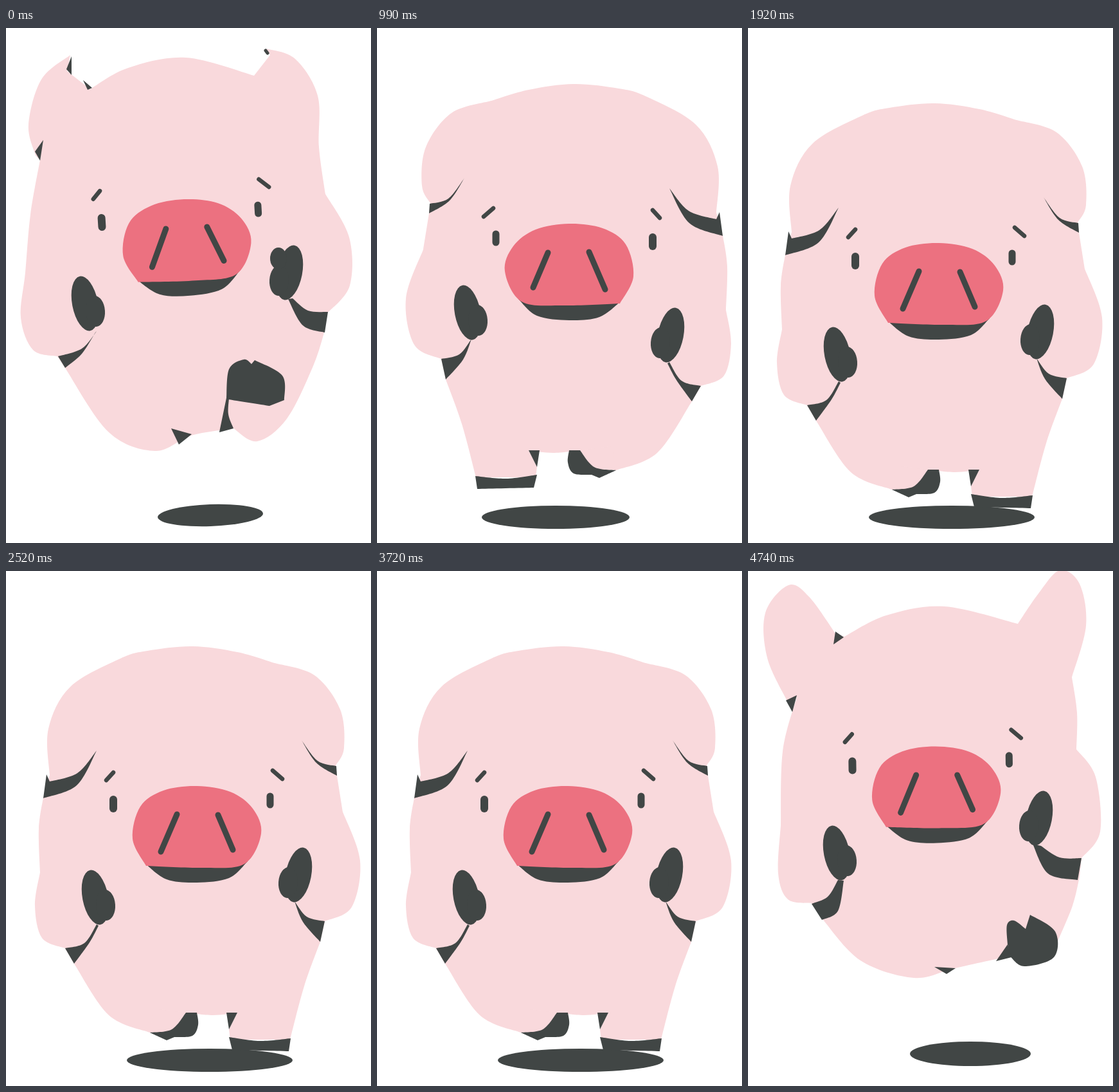
Write an HTML page with a canvas that moves like this. It is 568 px wide and 800 px high and loops after 4.8 s.

```html
<!DOCTYPE html>
<html lang="en">
<head>
<meta charset="utf-8">
<title>Running pig</title>
<style>
html, body { margin: 0; width: 100%; height: 100%; overflow: hidden; background: #fff; }
canvas { display: block; width: 568px; height: 800px; }
</style>
</head>
<body>
<canvas id="stage" width="568" height="800"></canvas>
<script>
const PINK = '#f9d9dc', DARK = '#414645', ROSE = '#ec7180';
const STEP = 60, HALF = 5, MIRROR = 588;
const ctx = document.getElementById('stage').getContext('2d');

// Each run is a smooth curve through its points; runs meet at corners.
function blob(color, ...runs) {
  ctx.beginPath();
  for (const run of runs) {
    const last = run.length / 2 - 1;
    const at = i => {
      const k = 2 * Math.min(last, Math.max(0, i));
      return [run[k], run[k + 1]];
    };
    ctx.lineTo(...at(0));
    for (let i = 0; i < last; i++) {
      const [a, b, c, d] = [at(i - 1), at(i), at(i + 1), at(i + 2)];
      ctx.bezierCurveTo(
        b[0] + (c[0] - a[0]) / 6, b[1] + (c[1] - a[1]) / 6,
        c[0] - (d[0] - b[0]) / 6, c[1] - (d[1] - b[1]) / 6, ...c);
    }
  }
  ctx.closePath();
  ctx.fillStyle = color;
  ctx.fill();
}

const body = (...runs) => blob(PINK, ...runs);
const mark = (...runs) => blob(DARK, ...runs);
const corner = (...points) => mark(...points.map(p => p));

function oval(x, y, rx, ry, tilt = 0) {
  ctx.beginPath();
  ctx.ellipse(x, y, rx, ry, tilt * Math.PI / 180, 0, Math.PI * 2);
  ctx.fillStyle = DARK;
  ctx.fill();
}

function line(x1, y1, x2, y2, width) {
  ctx.beginPath();
  ctx.moveTo(x1, y1);
  ctx.lineTo(x2, y2);
  ctx.lineWidth = width;
  ctx.strokeStyle = DARK;
  ctx.lineCap = 'round';
  ctx.stroke();
}

// side: -1 for the left hand, 1 for the right one
function hand(x, y, side) {
  oval(x, y, 20, 43, side * 11);
  oval(x - side * 16, y + 12, 15, 24, side * 4);
}

function face(dx, dy, tilt) {
  ctx.save();
  ctx.translate(297 + dx, 398 + dy);
  ctx.rotate(tilt * Math.PI / 180);
  mark([-80, 57, -47, 81, 0, 86, 50, 79, 79, 53]);
  blob(ROSE, [-79, 60, -100, 18, -88, -32, -52, -57, 0, -64, 52, -55, 87, -29, 100, 10, 74, 57, 10, 63, -79, 60]);
  line(-31, -20, -56, 38, 9);
  line(33, -19, 56, 35, 9);
  line(-130, -43, -130, -29, 12);
  line(114, -48, 114, -35, 11);
  line(-130, -85, -141, -73, 6.5);
  line(118, -88, 133, -75, 6.5);
  ctx.restore();
}

function fall() {
  oval(318, 757, 82, 17, -2);
  body(
    [100, 42, 55, 80, 35, 150, 46, 198],
    [53, 205, 38, 290, 30, 380, 23, 450, 42, 500, 80, 510],
    [92, 528, 160, 628, 232, 657, 288, 633, 354, 622],
    [354, 622, 391, 642, 437, 607, 478, 525, 496, 470],
    [500, 443, 535, 400, 534, 325, 497, 258],
    [497, 258, 487, 185, 485, 105, 450, 48, 405, 32],
    [411, 42], [386, 74, 280, 46, 190, 62, 131, 95], [95, 67]);
  corner([94, 64], [102, 44], [102, 73]);
  corner([120, 81], [134, 93], [127, 96]);
  line(404, 35, 407, 39, 5);
  corner([58, 174], [53, 206], [45, 192]);
  hand(123, 428, -1);
  hand(441, 380, 1);
  oval(424, 358, 13, 17);
  mark([141, 471, 118, 498, 81, 510], [92, 528, 118, 506, 139, 473]);
  mark([439, 421, 462, 462, 496, 473], [501, 441, 470, 439, 446, 420]);
  mark([343, 578, 347, 530, 370, 515, 382, 522], [387, 516, 430, 540, 433, 578], [410, 587, 346, 577]);
  mark([344, 570, 332, 628], [354, 622, 346, 600, 347, 575]);
  corner([257, 622], [289, 631], [269, 647]);
  face(-16, -68, -3.5);
}

function land() {
  oval(317, 760, 129, 18);
  runner(0, 0);
}

function drop() {
  oval(310, 760, 115, 18);
  runner(-8, -30);
}

function runner(dx, dy) {
  ctx.translate(dx, dy);
  body(
    [68, 317, 66, 245, 100, 180, 178, 136, 220, 124, 290, 117, 360, 126, 418, 143],
    [418, 143, 480, 162, 520, 215, 526, 275, 513, 302],
    [515, 318, 524, 374],
    [524, 374, 551, 450, 538, 522, 496, 544],
    [489, 576, 464, 645, 442, 728],
    [349, 728, 347, 712], [360, 686, 322, 690, 280, 686],
    [224, 717, 160, 690, 106, 610],
    [92, 586, 56, 570, 45, 520, 53, 468],
    [53, 468, 51, 400, 58, 352]);
  mark([141, 279, 111, 314, 68, 327], [63, 316], [58, 353, 110, 333, 141, 279]);
  mark([460, 263, 485, 295, 514, 303], [515, 318, 483, 298, 460, 263]);
  hand(139, 507, -1);
  hand(455, 472, 1);
  mark([141, 549, 122, 578, 92, 586], [106, 610, 130, 577, 144, 551]);
  mark([449, 513, 468, 537, 496, 544], [489, 576, 462, 545, 449, 513]);
  body([224, 717, 258, 713, 280, 686], [230, 680]);
  mark([280, 686, 297, 686], [297, 686, 299, 705, 290, 722, 262, 724], [250, 729, 224, 717], [224, 717, 258, 712, 280, 686]);
  corner([343, 686], [360, 686], [347, 712]);
  mark([347, 724, 395, 730, 443, 726], [440, 746, 352, 744]);
  face(0, 0, 0);
}

function push() {
  oval(287, 755, 95, 18, -2);
  body(
    [86, 206, 75, 150, 95, 90, 140, 67, 220, 68, 305, 54, 365, 61, 413, 78],
    [413, 78, 480, 72, 515, 95, 534, 150, 526, 205],
    [526, 222, 535, 300],
    [535, 300, 559, 385, 546, 455, 508, 480],
    [496, 508, 425, 620, 350, 657, 301, 641],
    [301, 628, 227, 614], [141, 612, 101, 532],
    [92, 508, 55, 494, 43, 450, 61, 380],
    [61, 380, 63, 310, 78, 234]);
  corner([180, 80], [196, 68], [224, 67]);
  mark([137, 156, 116, 202, 84, 206], [77, 233, 108, 217, 137, 156]);
  mark([476, 154, 494, 193, 525, 204], [526, 222, 504, 217, 476, 154]);
  hand(145, 425, -1);
  hand(464, 405, 1);
  mark([150, 466, 127, 497, 92, 508], [101, 533, 130, 502, 155, 467]);
  mark([456, 445, 476, 474, 509, 481], [497, 508, 468, 476, 456, 445]);
  mark([141, 612, 185, 622, 226, 613], [226, 613, 225, 630, 207, 642, 181, 634], [172, 642, 152, 632, 141, 612]);
  corner([297, 627], [329, 628], [318, 637], [301, 641]);
  face(9.5, -69.5, 2.4);
}

function rise() {
  oval(346, 750, 94, 19);
  body(
    [136, 97, 95, 40, 63, 22, 27, 65, 30, 135, 62, 204],
    [76, 196, 54, 280, 51, 395],
    [51, 395, 47, 470, 62, 510, 99, 516],
    [116, 541, 175, 605, 258, 632, 322, 617, 408, 598],
    [482, 575, 505, 520, 516, 475],
    [519, 446, 548, 405, 541, 320, 511, 277],
    [511, 277, 512, 220, 504, 165],
    [504, 165, 526, 85, 516, 20, 485, -1, 452, 35, 420, 82],
    [420, 82, 305, 55, 215, 69, 150, 102]);
  corner([136, 94], [149, 103], [133, 114]);
  corner([59, 201], [76, 193], [69, 219]);
  hand(138, 438, -1);
  hand(453, 384, 1);
  mark([140, 480, 124, 506, 99, 517], [115, 542, 140, 528, 149, 481]);
  mark([443, 424, 467, 470, 513, 480], [519, 446, 485, 445, 456, 427]);
  mark([404, 580, 403, 550, 414, 543, 432, 556], [439, 534, 478, 560, 476, 600, 430, 614, 408, 599]);
  corner([386, 606], [404, 580], [410, 600]);
  corner([290, 615], [323, 617], [309, 626]);
  face(-4, -61.5, -0.9);
}

const stride = [fall, drop, land, push, rise];

function draw(index) {
  ctx.setTransform(1, 0, 0, 1, 0, 0);
  ctx.fillStyle = '#fff';
  ctx.fillRect(0, 0, 568, 800);
  // Every other stride, beginning with its rise, is mirrored.
  if (index >= 4 && index < 9) ctx.setTransform(-1, 0, 0, 1, MIRROR, 0);
  stride[index % HALF]();
}

const start = performance.now();
function tick() {
  const time = Math.max(0, performance.now() - start);
  draw(Math.floor(time / STEP) % (HALF * 2));
  requestAnimationFrame(tick);
}
tick();
</script>
</body>
</html>
```
